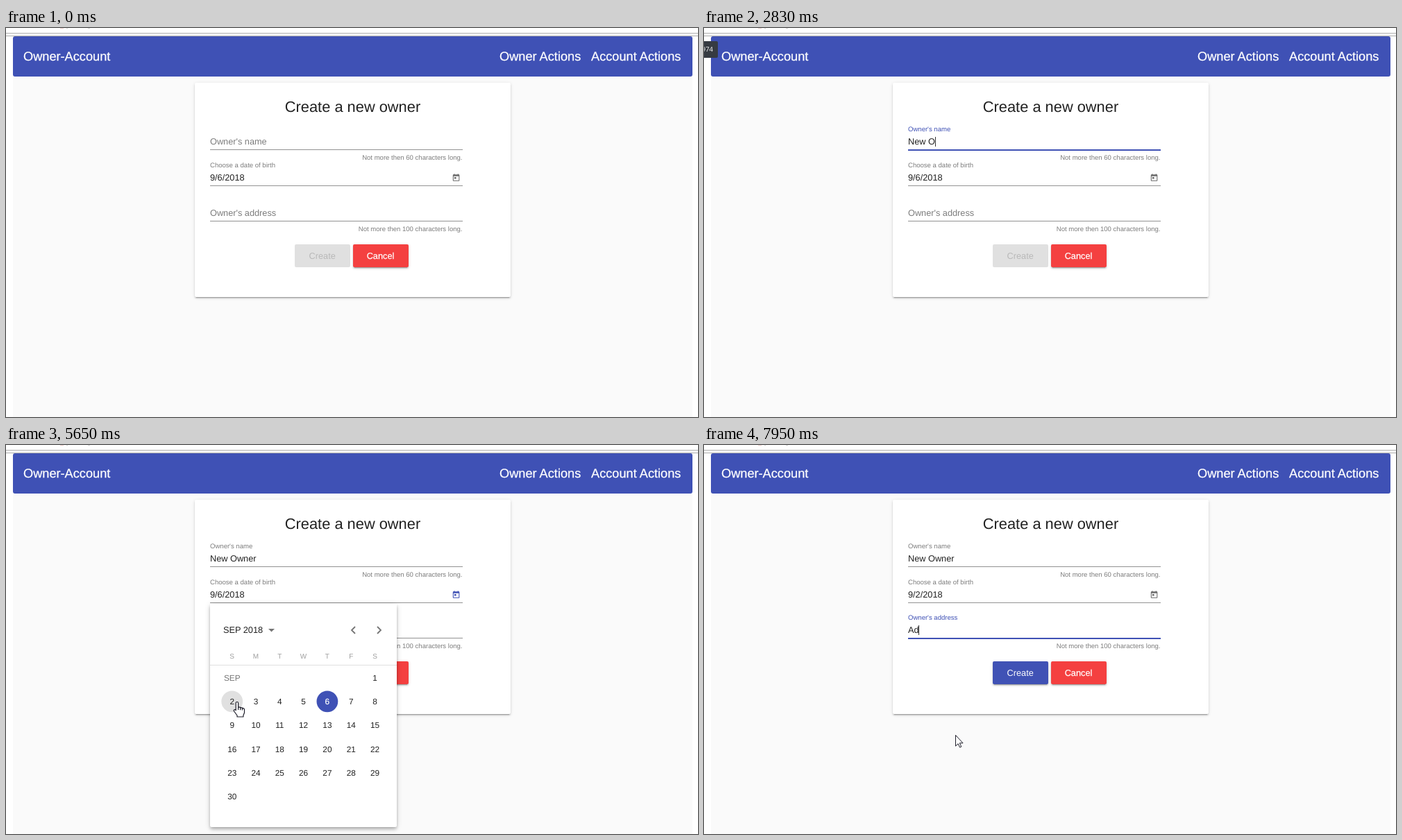
Recreate the animation shown at these times as an HTML page. Size 997 px wide and 561 px high, loop 8000 ms.

```html
<!DOCTYPE html>
<html lang="en">
<head>
<meta charset="utf-8">
<title>Create a new owner</title>
<style>
  html, body { margin: 0; width: 100%; height: 100%; overflow: hidden; background: #fff; }
  body { position: relative; font-family: "Liberation Sans", Arial, sans-serif; }
  body > *, .popup svg { position: absolute; }
  svg { left: 0; top: 0; overflow: hidden; }
  text { white-space: pre; text-rendering: geometricPrecision; fill: #212121; }
  .page { left: 10px; top: 12px; width: 979px; height: 549px; background: #fafafa; }
  .chrome { left: 0; top: 7px; width: 100%; height: 3px; background: #f3f3f3;
    border: solid #b4b4b4; border-width: 1px 0; }
  .bar { left: 10px; top: 12px; width: 979px; height: 58px; border-radius: 3px; background: #3f51b5; }
  .card, .button { border-radius: 2px; background: #fff;
    box-shadow: 0 3px 1px -2px #0003, 0 2px 2px #00000024, 0 1px 5px #0000001f; }
  .card { left: 272px; top: 79px; width: 455px; height: 309px; }
  .button { top: 312px; width: 80px; height: 32.5px; }
  .cancel { left: 499.5px; background: #f44040; }
  .create { left: 416px; }
  .popup { left: 294px; top: 229px; width: 269px; height: 322px; border-radius: 2px; background: #fff;
    transform-origin: top; box-shadow: 0 2px 4px -1px #0003, 0 4px 5px #00000024, 0 1px 10px #0000001f; }
  .heading { font-size: 18.2px; }
  .heading, .light { fill: #fff; stroke: #fff; stroke-width: .25px; }
  .title { font-size: 21.84px; }
  .body { font-size: 12.74px; }
  .small { font-size: 9.55px; }
  .grey { fill: #7c7c7c; }
  .end { text-anchor: end; }
  .middle { text-anchor: middle; }
  .rule { fill: #929292; }
  .ripple { fill: #3f51b5; transform-box: fill-box; transform-origin: center; }
</style>
</head>
<body>
<div class="page"></div>
<div class="chrome"></div>
<div class="bar"></div>
<div class="card"></div>
<div class="button create" id="create"></div>
<div class="button cancel"></div>

<svg width="997" height="561">
  <path d="M87 0h2M118 0h3" stroke="#aaa"/>
  <path d="M78 0h5" stroke="#d9a09a"/>
  <text class="heading" x="25" y="47">Owner-Account</text>
  <text class="heading" x="711" y="47">Owner Actions</text>
  <text class="heading" x="843" y="47">Account Actions</text>
  <text class="title middle" x="499.5" y="121">Create a new owner</text>

  <rect class="rule" x="294" y="175" width="364" height="1"/>
  <rect class="rule" x="294" y="227" width="364" height="1"/>
  <rect class="rule" x="294" y="278" width="364" height="1"/>
  <text class="small grey end" x="657.5" y="190">Not more then 60 characters long.</text>
  <text class="small grey end" x="657.5" y="293">Not more then 100 characters long.</text>
  <text class="small grey" x="294" y="201">Choose a date of birth</text>
  <text class="body" x="294" y="220" id="date"></text>
  <path id="toggle" transform="translate(642.2 209.6) scale(.531)" d="M19 3h-1V1h-2v2H8V1H6v2H5c-1.1 0-2 .9-2 2v14c0 1.1.9 2 2 2h14c1.1 0 2-.9 2-2V5c0-1.1-.9-2-2-2zm0 16H5V8h14v11zM7 10h5v5H7z"/>

  <g id="name">
    <text class="label" x="294">Owner's name</text>
    <rect class="ripple" x="294" y="175" width="364" height="2"/>
    <text class="body value" x="294" y="168"></text>
    <rect class="caret" y="157" width="1" height="14" fill="#333"/>
  </g>
  <g id="address">
    <text class="label" x="294">Owner's address</text>
    <rect class="ripple" x="294" y="278" width="364" height="2"/>
    <text class="body value" x="294" y="271"></text>
    <rect class="caret" y="260" width="1" height="14" fill="#333"/>
  </g>

  <text class="body middle" x="455.7" y="333" id="createText">Create</text>
  <text class="body light middle" x="539.5" y="333">Cancel</text>

  <g id="badge">
    <rect x="-10" y="19" width="30" height="24" rx="2" fill="#363b42"/>
    <text x="13" y="34" class="end" style="font:9.5px 'Open Sans',sans-serif;fill:#fff">974</text>
  </g>
</svg>

<div class="popup" id="popup"><svg width="269" height="322" id="calendar">
  <text x="19" y="42" font-size="12.74">SEP 2018</text>
  <path d="M84 36h9l-4.5 4.5z" fill="#757575"/>
  <path d="M209 33l-5 5 5 5M241 33l5 5-5 5" fill="none" stroke="#757575" stroke-width="1.8"/>
  <path d="M0 88.5h269" stroke="#e0e0e0"/>
</svg></div>

<svg width="997" height="561">
  <g id="cursor" stroke="#1c1c28" stroke-linejoin="round">
    <path id="arrow" fill="#fff" d="M.5.5v15.7l3.6-3.4 2.5 5.3 2.2-1-2.5-5.2h4.8z"/>
    <path id="hand" fill="#fff" stroke-width="1.2" d="M-1.8 11V1.2a1.7 1.7 0 0 1 3.4 0V7l2 .2 2.8.6 2.4.8c1.2.4 1.7 1.2 1.7 2.4v4l-1.6 4v2H0v-2l-4.4-6c-1.2-1.8.6-3.2 2.6-1.5zM1.6 7v4M4.6 7.6v3.6M7.4 8.4v3"/>
    <path id="beam" fill="none" stroke-width="1.3" d="M-3.5-7.3h2.5l1 .8 1-.8h2.5M0-6.5v13M-3.5 7.3h2.5l1-.8 1 .8h2.5"/>
  </g>
</svg>

<script>
const LOOP = 8000, STEP = 77.1;
const GREY = [124, 124, 124], BLUE = [63, 81, 181], WHITE = [255, 255, 255];
const OPEN = 5010, PICK = 5950;
const $ = id => document.getElementById(id);
const clamp = v => Math.min(1, Math.max(0, v));
const mix = (a, b, p) => a + (b - a) * p;
const blend = (a, b, p) => `rgb(${a.map((v, i) => Math.round(mix(v, b[i], p)))})`;

function bezier(x1, y1, x2, y2) {
  const at = (a, b, u) => 3 * a * u * (1 - u) ** 2 + 3 * b * u * u * (1 - u) + u ** 3;
  return x => {
    if (x <= 0 || x >= 1) return clamp(x);
    let lo = 0, hi = 1;
    for (let i = 0; i < 20; i++) {
      const mid = (lo + hi) / 2;
      if (at(x1, x2, mid) < x) lo = mid; else hi = mid;
    }
    return at(y1, y2, lo);
  };
}
const swift = bezier(.25, .8, .25, 1), late = bezier(.55, 0, .55, .2);

// time, x, y, shape from this point on
const track = [
  [0, 1010, 400, 'arrow'], [203, 1010, 400, 'arrow'], [280, 743, 337, 'arrow'],
  [520, 610, 245, 'arrow'], [820, 495, 164, 'beam'], [970, 481, 157, 'beam'],
  [1205, 481, 157, 'beam'], [1282, 590, 190, 'arrow'], [1436, 884, 277, 'arrow'],
  [1513, 1010, 310, 'arrow'], [4170, 1010, 345, 'arrow'], [4247, 921, 321, 'arrow'],
  [4480, 740, 245, 'arrow'], [4720, 644, 212, 'hand'], [4864, 641, 207, 'hand'],
  [5018, 641, 207, 'hand'], [5080, 560, 222, 'arrow'], [5172, 462, 240, 'arrow'],
  [5400, 365, 340, 'hand'], [5710, 323, 381, 'hand'], [6180, 323, 381, 'hand'],
  [6220, 318, 379, 'arrow'], [6410, 268, 358, 'arrow'], [6640, 359, 289, 'arrow'],
  [6790, 340, 262, 'beam'], [6875, 338, 257, 'beam'], [7025, 349, 263, 'beam'],
  [7177, 352, 265, 'beam'], [7330, 352, 265, 'beam'], [7400, 353, 285, 'arrow'],
  [7790, 362, 418, 'arrow'], [LOOP, 362, 418, 'arrow']
];

const fields = [
  { el: $('name'), base: 168, focus: 1090, blur: 4390, text: 'New Owner',
    keys: [2130, 2280, 2450, 2600, 2830, 3300, 3460, 3540, 3620], caret: [[1090, 1680], [2130, 4170]] },
  { el: $('address'), base: 271, focus: 7230, blur: Infinity, text: 'Ad',
    keys: [7640, 7880], caret: [[7230, LOOP]] }
];
for (const f of fields)
  for (const part of ['label', 'ripple', 'value', 'caret']) f[part + 'El'] = f.el.querySelector('.' + part);

function add(tag, attrs, text = '') {
  const el = document.createElementNS('http://www.w3.org/2000/svg', tag);
  for (const key in attrs) el.setAttribute(key, attrs[key]);
  el.textContent = text;
  $('calendar').append(el);
  return el;
}
const CELL = 34.3;
const col = c => 31.7 + CELL * c, row = r => 106.5 + CELL * r;
const hover = add('circle', { cx: col(0), cy: row(1), r: 15.4 });
add('circle', { cx: col(4), cy: row(1), r: 15.4, fill: '#3f51b5' });
[...'SMTWTFS'].forEach((d, c) =>
  add('text', { x: col(c), y: 79, class: 'middle', 'font-size': 10, style: 'fill:#9e9e9e' }, d));
add('text', { x: col(0), y: row(0) + 4, class: 'middle', 'font-size': 11.8, style: 'fill:#757575' }, 'SEP');
for (let day = 1; day <= 30; day++) {
  const cell = day + 5;
  add('text', { x: col(cell % 7), y: row(Math.floor(cell / 7)) + 4.2, 'font-size': 11.8,
    class: day === 6 ? 'middle light' : 'middle' }, day);
}

function drawField(f, t, step) {
  const lift = swift((step - f.focus) / 400);
  const wave = swift((step - f.focus) / 300);
  const active = 1 - swift((step - f.blur) / 300);
  f.labelEl.style.fontSize = mix(12.74, 9.55, lift) + 'px';
  f.labelEl.style.fill = blend(GREY, BLUE, lift * active);
  f.labelEl.setAttribute('y', f.base - 19 * lift);
  f.rippleEl.style.opacity = wave * active;
  f.rippleEl.style.transform = `scaleX(${mix(.5, 1, wave)})`;
  const typed = f.text.slice(0, f.keys.filter(k => k <= t).length);
  if (f.valueEl.textContent !== typed) f.valueEl.textContent = typed;
  const width = typed ? f.valueEl.getComputedTextLength() : 0;
  f.caretEl.setAttribute('x', Math.floor(294.1 + width));
  f.caretEl.style.opacity = +f.caret.some(([a, b]) => t >= a && t < b);
}

function drawPopup(step) {
  const open = swift((step - OPEN) / 400);
  const shown = open * (1 - clamp((step - PICK) / 100));
  $('popup').style.opacity = shown;
  $('popup').style.transform = `scaleY(${open})`;
  $('calendar').style.opacity = late((step - OPEN - 100) / 400);
  hover.style.fill = step > 5560 ? '#e0e0e0' : 'none';
  $('toggle').style.fill = step >= OPEN && step < PICK ? '#3f51b5' : '#6a6a6a';
  $('date').textContent = step < PICK ? '9/6/2018' : '9/2/2018';
}

function drawCreate(step) {
  const p = swift((step - 7640) / 400), button = $('create');
  button.style.background = blend([224, 224, 224], BLUE, p);
  button.style.boxShadow = p ? '' : 'none';
  $('createText').style.fill = blend([184, 184, 184], WHITE, p);
}

function drawCursor(step) {
  const i = Math.max(0, track.findLastIndex(k => k[0] <= step));
  const a = track[i], b = track[i + 1] || a;
  const p = clamp((step - a[0]) / (b[0] - a[0] || 1));
  $('cursor').setAttribute('transform', `translate(${Math.round(mix(a[1], b[1], p))} ${Math.round(mix(a[2], b[2], p))})`);
  for (const shape of ['arrow', 'hand', 'beam'])
    $(shape).style.display = shape === a[3] ? '' : 'none';
}

function draw() {
  const t = performance.now() % LOOP;
  // the screen refreshes in coarse steps; typing keeps its own times
  const origin = t < 2000 ? 280 : 4170;
  const step = origin + Math.floor((t - origin + 8) / STEP) * STEP;
  for (const f of fields) drawField(f, t, step);
  drawPopup(step);
  drawCreate(step);
  drawCursor(step);
  $('badge').style.opacity = +(t >= 1440 && t < 4170);
  requestAnimationFrame(draw);
}
draw();
</script>
</body>
</html>
```
